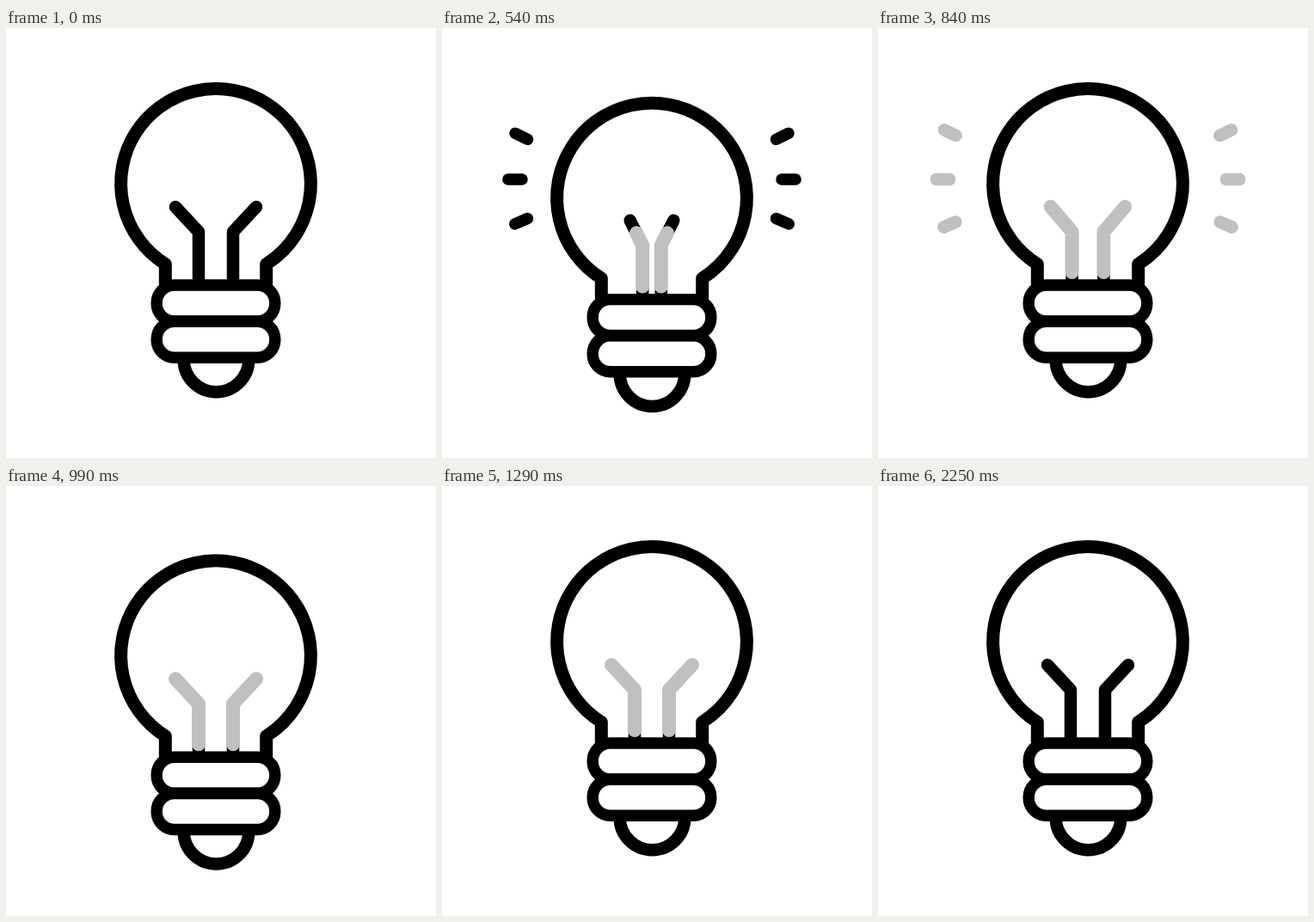
Recreate the animation shown at these times as an HTML page with a canvas. Size 500 px wide and 500 px high, loop 2310 ms.

```html
<!DOCTYPE html>
<html lang="en">
<head>
<meta charset="utf-8">
<title>Light bulb</title>
<style>
  html, body { margin: 0; width: 100%; height: 100%; overflow: hidden; background: #fff; }
  canvas { display: block; width: 500px; height: 500px; }
</style>
</head>
<body>
<canvas id="stage" width="500" height="500"></canvas>
<script>
const ctx = document.getElementById('stage').getContext('2d');
const LOOP = 2310, STEP = 30;
const BLACK = '#000', GREY = '#c0c0c0';
const CX = 244;

const progress = (t, from, to) => Math.min(1, Math.max(0, (t - from) / (to - from)));
const hump = (t, from, to) => Math.sin(Math.PI * progress(t, from, to)) ** 2;
const easeOut = p => 1 - (1 - p) ** 3;
const mix = (a, b, p) => a + (b - a) * p;

function stroke(color, width) {
  ctx.strokeStyle = color;
  ctx.lineWidth = width;
  ctx.stroke();
}

function tracePolyline(points) {
  ctx.beginPath();
  points.forEach(([x, y]) => ctx.lineTo(x, y));
}

function drawBulb() {
  const neck = Math.acos(58.7 / 110.4);
  ctx.beginPath();
  ctx.moveTo(185.3, 297);
  ctx.arc(CX, 181, 110.4, Math.PI - neck, neck);
  ctx.lineTo(302.7, 297);
  stroke(BLACK, 15);

  for (const y of [299, 341.3]) {
    ctx.beginPath();
    ctx.roundRect(175.2, y, 137.6, 41.9, 20.5);
    stroke(BLACK, 13.4);
  }

  ctx.beginPath();
  ctx.arc(CX + 0.5, 385.5, 37.8, 0, Math.PI);
  stroke(BLACK, 14.5);
}

function drawFilament(side, squeeze, lit) {
  const stemX = CX + side * (20 - squeeze);
  const tip = [CX + side * (47 - 2.35 * squeeze), 208 - 0.1 * squeeze];
  const elbow = [stemX, 237 - 0.1 * squeeze];

  tracePolyline([[stemX, 297], elbow, tip]);
  stroke(BLACK, 14.5);
  if (lit <= 0) return;

  const base = [stemX, 284];
  const stem = base[1] - elbow[1];
  const arm = Math.hypot(tip[0] - elbow[0], tip[1] - elbow[1]);
  const length = lit * (stem + arm);
  const points = [base, [stemX, base[1] - Math.min(length, stem)]];
  if (length > stem) {
    const p = (length - stem) / arm;
    points.push([mix(elbow[0], tip[0], p), mix(elbow[1], tip[1], p)]);
  }
  tracePolyline(points);
  stroke(GREY, 16);
}

// Each ray: inner x, inner y, outer x, outer y, measured right of the centre.
const RAYS = [
  [144.5, 129.5, 167, 118.5],
  [151, 176, 176, 176],
  [144.5, 221.5, 167.5, 231.5]
];

function drawRays(t) {
  const head = easeOut(progress(t, 450, 760));
  const tail = progress(t, 800, 900);
  const grey = progress(t, 615, 800);
  if (head <= 0 || tail >= 1) return;

  const segment = (side, [x0, y0, x1, y1], end, color, width) => {
    tracePolyline([tail, Math.max(tail, end)].map(p => [CX + side * mix(x0, x1, p), mix(y0, y1, p)]));
    stroke(color, width);
  };
  for (const side of [-1, 1]) {
    for (const ray of RAYS) {
      segment(side, ray, head, BLACK, 13.5);
      if (grey > 0) segment(side, ray, Math.min(head, grey), GREY, 14.5);
    }
  }
}

function draw(t) {
  const drop = 18 * hump(t, 355, 806) + 18.5 * hump(t, 870, 1180);
  const squeeze = 10.8 * hump(t, 315, 915);
  const lit = progress(t, 345, 590) - progress(t, 1590, 1860);

  ctx.fillStyle = '#fff';
  ctx.fillRect(0, 0, 500, 500);
  ctx.lineCap = 'round';
  ctx.lineJoin = 'round';

  drawRays(t);
  ctx.save();
  ctx.translate(0, drop);
  drawBulb();
  drawFilament(-1, squeeze, lit);
  drawFilament(1, squeeze, lit);
  ctx.restore();
}

const start = performance.now();
function frame() {
  const t = (performance.now() - start) % LOOP;
  draw(Math.floor(t / STEP) * STEP);
  requestAnimationFrame(frame);
}
frame();
</script>
</body>
</html>
```
